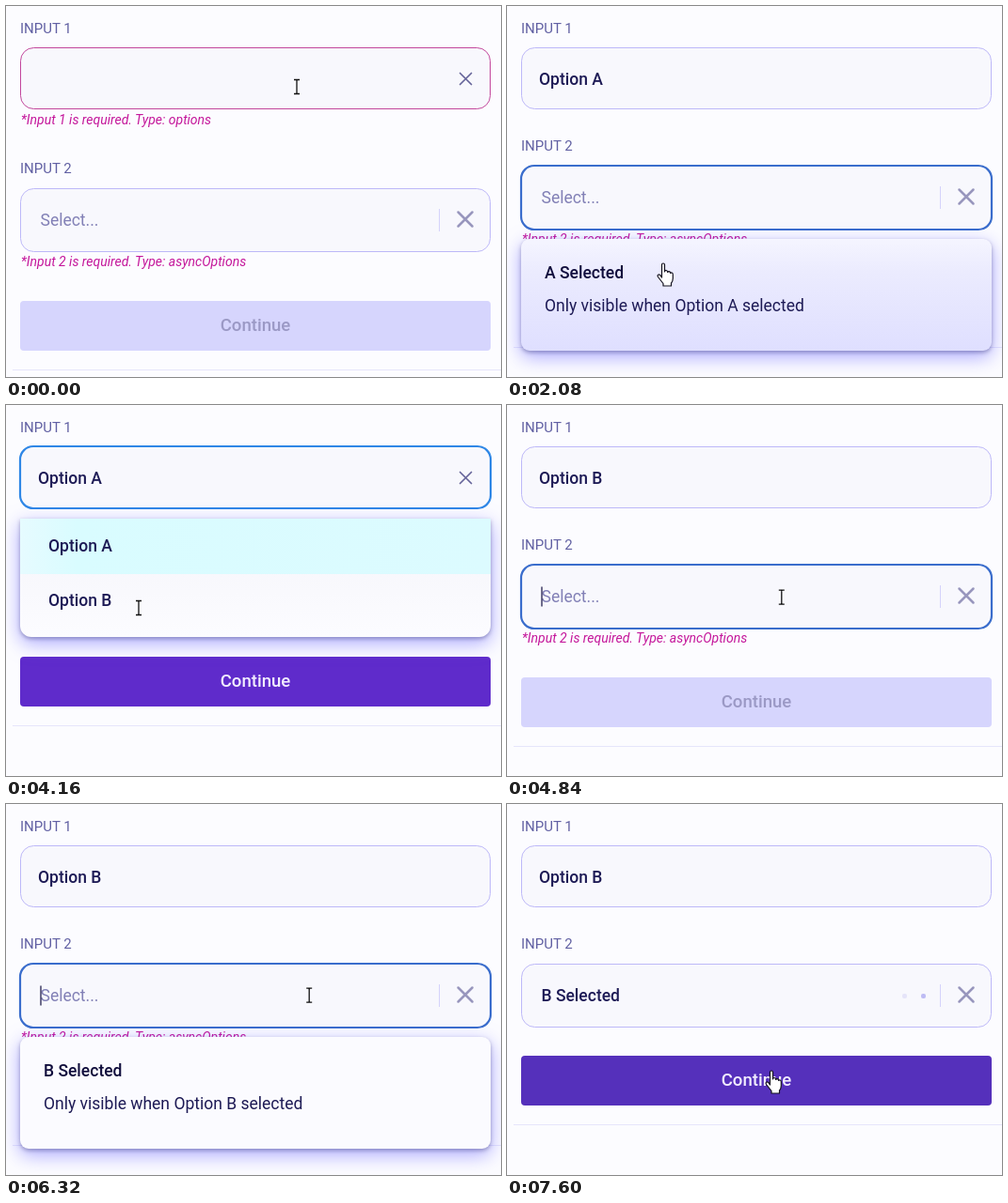
An HTML page for the animation above (7.64 s loop, 526 by 395 pixels).

```html
<!DOCTYPE html>
<html lang="en">
<head>
<meta charset="utf-8">
<title>Dependent inputs</title>
<style>
  html, body { margin: 0; width: 100%; height: 100%; overflow: hidden; background: #fcfcff; }
  svg { display: block; width: 526px; height: 395px; }
  text { font: 400 17.5px Roboto, Arial, sans-serif; fill: #1d1a55; }
  .medium { font-weight: 500; }
  .label { font-size: 15px; fill: #6160a3; }
  .error { font-size: 14px; font-style: italic; fill: #c4179b; }
  .hint { fill: #8280b6; }
  .strong { font-weight: 500; fill: #100d3c; }
  .button { font-size: 18.6px; font-weight: 500; text-anchor: middle; }
  .field { fill: #f8f8fd; }
  .menu { filter: drop-shadow(0 2px 2px rgba(50,50,110,.4)) drop-shadow(0 6px 10px rgba(95,90,255,.5)); }
  .cross { fill: none; stroke-linecap: round; }
</style>
</head>
<body>
<svg viewBox="0 0 526 395">
  <defs>
    <linearGradient id="hover" x2="0" y2="1">
      <stop stop-color="#f5f5ff"/><stop offset=".3" stop-color="#ebebfe"/><stop offset="1" stop-color="#dfdfff"/>
    </linearGradient>
    <linearGradient id="list" x2="0" y2="1">
      <stop stop-color="#f4f4fa"/><stop offset="1" stop-color="#fcfcff"/>
    </linearGradient>
    <linearGradient id="picked">
      <stop stop-color="#e6fbff"/><stop offset=".12" stop-color="#d9fcff"/><stop offset="1" stop-color="#dcfbff"/>
    </linearGradient>
  </defs>

  <text class="label" x="15" y="29">INPUT 1</text>
  <rect id="field1" class="field" rx="14"/>
  <text id="value1" class="medium" x="34" y="84"></text>
  <path id="clear1" class="cross" d="M482.500 71.500l12 12m0-12l-12 12" stroke="#66649a" stroke-width="1.7"/>
  <text id="error1" class="error" x="16" y="126">*Input 1 is required. Type: options</text>

  <g id="second">
    <text class="label" x="15" y="154">INPUT 2</text>
    <rect id="field2" class="field" rx="14"/>
    <text id="value2" x="36.500" y="210"></text>
    <path id="caret" d="M37 193.500v21" stroke="#23204f" stroke-width="1.300"/>
    <rect id="dot1" x="420" y="202" width="5" height="5" rx="2" fill="#b9b7f3"/>
    <rect id="dot2" x="440" y="202" width="5" height="5" rx="2" fill="#b9b7f3"/>
    <path d="M460.500 192v24" stroke="#d5d3fb"/>
    <path class="cross" d="M480.500 195.500l15 15m0-15l-15 15" stroke="#9896bd" stroke-width="2.500"/>
    <text id="error2" class="error" x="16" y="253">*Input 2 is required. Type: asyncOptions</text>
  </g>

  <g id="footer">
    <path d="M7 341.500H526" stroke="#e6e5fb"/>
    <rect id="button" x="15" y="268" width="500" height="53" rx="4"/>
    <text id="buttonText" class="button" x="265" y="300">Continue</text>
  </g>

  <g id="menu1">
    <path class="menu" d="M15 121H515V235a12 12 0 0 1-12 12H27a12 12 0 0 1-12-12Z" fill="url(#list)"/>
    <rect x="15" y="121" width="500" height="59" fill="url(#picked)"/>
    <text class="medium" x="45" y="156">Option A</text>
    <text class="medium" x="45" y="214">Option B</text>
  </g>

  <g id="menu2">
    <rect id="panel" class="menu" x="15" y="248" width="500" height="119" rx="9"/>
    <text id="title" class="strong" x="40" y="290"></text>
    <text id="detail" x="40" y="325"></text>
  </g>

  <g id="beam" fill="none">
    <path d="M-3-7.500h2.500l.5 1 .5-1H3M-3 7.500h2.500l.5-1 .5 1H3M0-7V7" stroke="#111" stroke-width="1.300"/>
  </g>
  <path id="hand" fill="#fff" stroke="#15131f" stroke-width="1.200" stroke-linejoin="round"
    d="M-1.500 1.500Q-1.500 0 0 0T1.500 1.500V8.500Q4 6.800 4.800 9Q7 7.800 7.800 10Q10.500 9.300 10.500 12V17Q10.500 20 8.500 21.500V24H0V21.500Q-3-17 0 0L-1.500 1.500"/>
</svg>
<script>
const LOOP = 7640;
const $ = id => document.getElementById(id);
const set = (id, attrs) => { for (const k in attrs) $(id).setAttribute(k, attrs[k]); };
const show = (id, on) => { $(id).style.display = on ? '' : 'none'; };
const write = (id, text) => { if ($(id).textContent !== text) $(id).textContent = text; };
const within = (t, [a, b]) => t >= a && t < b;

// Pointing hand with its fingertip at the origin
set('hand', { d: 'M-1.500 15V1.500Q-1.500 0 0 0T1.500 1.500V9Q1.800 7.300 3.200 7.500T4.700 9.500Q5 8.300 6.300 8.600T7.700 10.500Q8.200 9.500 9.300 10T10.300 12V16Q10.300 19 8.500 21V24H0V21.500L-5.500 14.500Q-6.500 12.500-5 12T-1.500 15Z' });

// Pointer stops: time, x, y
const path = [
  [0, 309, 86], [320, 309, 86], [760, 170, 152], [960, 165, 153],
  [1280, 185, 205], [1520, 185, 207], [1840, 172, 272], [2080, 166, 274],
  [2600, 166, 276], [3000, 183, 214], [3400, 155, 82], [3640, 150, 80],
  [4160, 141, 216], [4320, 141, 214], [4720, 290, 205], [5600, 325, 198],
  [6440, 322, 204], [6760, 295, 284], [7360, 275, 288], [7440, 276, 288],
  [7600, 281, 284], [LOOP, 281, 284]
];
const open1 = [[360, 960], [3640, 4320]];
const open2 = [[1480, 2640], [4960, 7460]];
const focus2 = [[1360, 2640], [4760, 7460]];
const loading = [[2750, 3300], [6950, LOOP]];

const any = (t, spans) => spans.find(span => within(t, span));

function pointer(t) {
  const i = Math.max(1, path.findIndex(p => p[0] > t));
  const [a, b] = [path[i - 1], path[i]];
  const u = (t - a[0]) / (b[0] - a[0]);
  const e = u * u * (3 - 2 * u);
  return [a[1] + (b[1] - a[1]) * e, a[2] + (b[2] - a[2]) * e];
}

function frameField(id, y, height, color, focused) {
  const inset = focused ? 0 : .5;
  set(id, {
    x: 15 + inset, y: y + inset, width: 500 - 2 * inset, height: height - 2 * inset,
    stroke: color, 'stroke-width': focused ? 2.2 : 1
  });
}

function pulse(time) {
  const u = time / 1000;
  return u <= 0 || u >= .8 ? 0 : (1 - Math.cos(u / .4 * Math.PI)) / 2;
}

function draw(t) {
  const choice = t < 960 ? '' : t < 4320 ? 'A' : 'B';
  const done = within(t, [2640, 4320]) || t >= 7460;
  const list1 = any(t, open1), list2 = any(t, open2), focus = any(t, focus2);
  const [x, y] = pointer(t);
  const shift = choice ? 0 : 24;
  const drop = shift + (done ? 0 : 22);

  const over1 = y > 44 && y < 110;
  const border1 = list1 ? '#2f87e6' : choice ? '#bdb8f8' : '#c2479c';
  frameField('field1', 44, 66, border1, list1);
  write('value1', choice && 'Option ' + choice);
  show('clear1', list1 || over1);
  show('error1', !choice);

  set('second', { transform: `translate(0 ${shift})` });
  frameField('field2', 170, 68, focus ? '#3a6dcc' : '#bdb8f8', focus);
  write('value2', done ? choice + ' Selected' : 'Select...');
  $('value2').setAttribute('class', done ? 'medium' : 'hint');
  show('caret', focus && (t - focus[0]) % 1060 < 530 || within(t, [5480, 5700]));
  show('error2', !done);
  const load = any(t, loading);
  const phase = load && done ? (t - load[0]) % 1000 : 0;
  set('dot1', { opacity: pulse(phase) });
  set('dot2', { opacity: pulse(phase - 320) });

  const overButton = done && !list1 && y > 268 && y < 321;
  set('footer', { transform: `translate(0 ${drop})` });
  set('button', { fill: !done ? '#d6d5fd' : overButton ? '#5530bb' : '#5f2bcb' });
  $('buttonText').style.fill = !done ? '#9b99c5' : '#f2edff';

  show('menu1', list1);
  show('menu2', list2);
  const overMenu = list2 && y > 248 && y < 367;
  set('panel', { fill: overMenu ? 'url(#hover)' : '#fbfbff' });
  write('title', choice + ' Selected');
  write('detail', `Only visible when Option ${choice} selected`);

  const hand = overMenu || overButton;
  show('hand', hand);
  show('beam', !hand);
  set(hand ? 'hand' : 'beam', { transform: `translate(${x.toFixed(1)} ${y.toFixed(1)})` });
}

const start = performance.now();
function tick(now) {
  draw(Math.max(0, now - start) % LOOP);
  requestAnimationFrame(tick);
}
draw(0);
requestAnimationFrame(tick);
</script>
</body>
</html>
```
